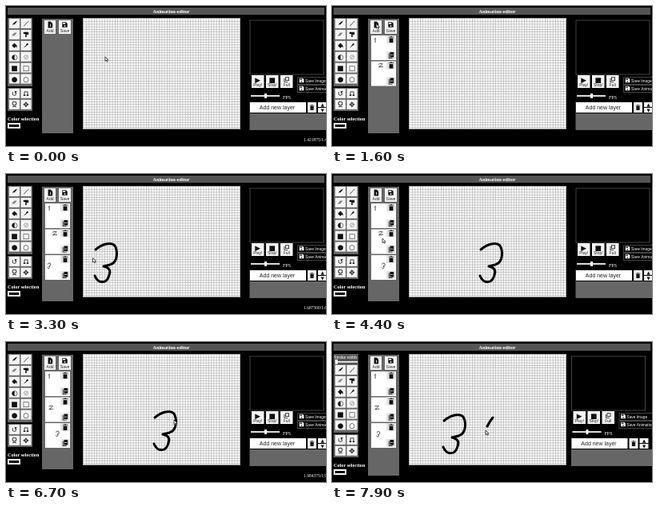
These frames come from a looping animation (400 by 176 pixels, 8 s). An HTML page with a canvas:

```html
<!DOCTYPE html>
<html lang="en">
<head>
<meta charset="utf-8">
<title>Animation-editor</title>
<style>
html, body { margin: 0; width: 100%; height: 100%; overflow: hidden; background: #000; }
canvas { display: block; }
</style>
</head>
<body>
<canvas id="stage" width="400" height="176"></canvas>
<script>
const ctx = document.getElementById('stage').getContext('2d');
const LOOP = 8000, PENCIL = 7450;
const SERIF = '"Liberation Serif", serif', SANS = '"Liberation Sans", sans-serif';
const GLYPHS = '"DejaVu Sans", sans-serif';

// Shapes in a 10 x 10 box; any other icon name is drawn as a glyph.
const shapes = {
  brush: 'M2 8L4 6L5 7L9 2L8 1L3 5Z',
  line: 'M1 9L9 1V2L2 9Z',
  eraser: 'M1 6L5 2H9L5 7H1Z',
  roller: 'M1 1H9V5H6V9H4V4H1Z',
  bucket: 'M1 5L5 1L9 5V8H8V6L5 9Z',
  picker: 'M1 9L5 4L7 1L9 3L6 5Z',
  nodes: 'M1 7H2V2H8V7H9V9H6V7H7V3H3V7H4V9H1Z',
  lasso: 'M5 0A3 3 0 1 0 5 7A3 3 0 1 0 5 0M5 1A2 2 0 1 1 5 6A2 2 0 1 1 5 1M2 8H8V9H2Z',
  add: 'M2 0H6L9 3V10H2ZM5 4V8H6V4Z',
  save: 'M1 1H7L9 3V9H1ZM2 2V4H6V2ZM4 6V8H6V6Z',
  trash: 'M2 3H8V10H2ZM1 1H4V0H6V1H9V2H1Z',
  copy: 'M1 2H2V9H7V10H1ZM3 0H9V8H3ZM4 4V5H8V4Z',
  full: 'M3 1H9V7H3ZM4 2V6H8V2ZM1 3H2V8H7V9H1Z'
};
const tools = ['brush', 'line', 'eraser', 'roller', 'bucket', 'picker', '◐', '⊘',
  '■', '□', '●', '○', '↺', 'nodes', 'lasso', '✥'];
const pale = ['eraser', '⊘'];

function inkPath(d) {
  const el = document.createElementNS('http://www.w3.org/2000/svg', 'path');
  el.setAttribute('d', d);
  return { el, path: new Path2D(d), length: el.getTotalLength() };
}
const digits = [
  'M119 48L127 40Q126 60 126 78',
  'M124 97C134 93 151 90 156 93C160 96 137 114 124 124Q142 122 160 121',
  'M186 95C194 88 205 85 210 90C214 97 213 108 208 112C204 115 199 115 196 116C204 118 205 122 203 127C200 139 189 138 185 128'
].map(inkPath);
const slash = inkPath('M201 95Q197 100 194 106');

const drawnAt = [[0, 0], [34, -56], [-74, 0]];
const drags = [
  { digit: 2, start: 3400, end: 3900, by: [74, 0] },
  { digit: 1, start: 4900, end: 5250, by: [-34, 56] },
  { digit: 2, start: 6750, end: 7200, by: [-46, 4] }
];
const strokes = [[100, 450], [1000, 1400], [1750, 2130]];
const added = [750, 1600, 2300];

const ramp = (t, a, b) => Math.min(1, Math.max(0, (t - a) / (b - a)));
const ease = p => p * p * (3 - 2 * p);

function offset(i, t, step = ease) {
  return drags.filter(d => d.digit === i).reduce(([x, y], d) => {
    const p = step(ramp(t, d.start, d.end));
    return [x + d.by[0] * p, y + d.by[1] * p];
  }, drawnAt[i]);
}

// Cursor stops: the hand follows each stroke and travels between the controls.
function follow(ink, [start, end], [dx, dy] = [0, 0]) {
  return Array.from({ length: 9 }, (_, i) => {
    const pt = ink.el.getPointAtLength(ink.length * i / 8);
    return [start + (end - start) * i / 8, pt.x + dx, pt.y + dy];
  });
}
const drag = ({ start, end, by: [dx, dy] }, x, y) => [[start, x, y], [end, x + dx, y + dy]];
const written = i => follow(digits[i], strokes[i], drawnAt[i]);
const stops = [
  [0, 124, 66], ...written(0), [750, 55, 24], [900, 73, 41],
  ...written(1), [1600, 55, 24],
  ...written(2), [2300, 59, 33], [2500, 61, 118], [2700, 61, 118],
  [3000, 25, 125], ...drag(drags[0], 136, 102), [4400, 63, 83], [4500, 63, 83],
  [4700, 25, 125], ...drag(drags[1], 175, 52), [5600, 60, 118], [5950, 60, 118],
  [6250, 25, 125], [6650, 210, 100], ...drag(drags[2], 210, 100),
  [PENCIL, 11, 23], ...follow(slash, [7780, 7880]), [7900, 192, 113], [LOOP, 192, 113]
];
function hand(t) {
  const i = stops.findIndex(s => s[0] > t);
  const [t0, x0, y0] = stops[i - 1], [t1, x1, y1] = stops[i];
  const p = ramp(t, t0, t1);
  return [x0 + (x1 - x0) * p, y0 + (y1 - y0) * p];
}

function box(x, y, w, h, color) {
  ctx.fillStyle = color;
  ctx.fillRect(x, y, w, h);
}

function text(str, x, y, font, color = '#fff', align = 'left') {
  ctx.font = font;
  ctx.fillStyle = color;
  ctx.textAlign = align;
  ctx.fillText(str, x, y);
}

function icon(name, x, y, size, color = '#111') {
  ctx.save();
  ctx.translate(x, y);
  ctx.scale(size / 10, size / 10);
  if (shapes[name]) {
    ctx.fillStyle = color;
    ctx.fill(new Path2D(shapes[name]), 'evenodd');
  } else {
    text(name, 5, 9, '11px ' + GLYPHS, color, 'center');
  }
  ctx.restore();
}

function button(x, y, w, h, name, size, label) {
  box(x, y, w, h, '#f4f4f4');
  icon(name, x + (w - size) / 2, y + (label ? 1.5 : (h - size) / 2), size, pale.includes(name) ? '#888' : '#111');
  if (label) text(label, x + w / 2, y + h - 2, '5px ' + SANS, '#222', 'center');
}

function slider(x, y, w, knob) {
  box(x, y, w, 2, '#ddd');
  box(x + knob, y - 2, 3, 6, '#fff');
}

function ink({ path, length }, [x, y] = [0, 0], progress = 1, width = 3) {
  if (!progress) return;
  ctx.save();
  ctx.translate(x, y);
  ctx.lineWidth = width;
  ctx.strokeStyle = '#000';
  ctx.lineCap = ctx.lineJoin = 'round';
  ctx.setLineDash(progress < 1 ? [progress * length, length * 2] : []);
  ctx.stroke(path);
  ctx.restore();
}

function toolbar(pencil) {
  ctx.save();
  if (pencil) {
    box(2, 15, 31, 14, '#555');
    text('Stroke width', 2.5, 20.5, 'bold 5.2px ' + SERIF, '#ddd');
    slider(4, 24, 28, 0);
    ctx.translate(0, 13);
  }
  box(2, 15, 31, 86, '#666');
  box(2, 103, 31, 29, '#666');
  tools.forEach((name, i) => {
    const row = i >> 1;
    button(4 + i % 2 * 14.5, 16 + row * 13.9 + (row > 5 ? 4.5 : 0), 13, 12, name, 8);
  });
  text('Color selection', 2, 144, 'bold 6.2px ' + SERIF);
  box(2, 147, 16, 7, '#fff');
  box(4, 149, 12, 3, '#000');
  ctx.restore();
}

function thumbnails(t, pencil) {
  box(45, 16, 39, pencil ? 152 : 144, '#666');
  button(48, 18, 14, 17, 'add', 8, 'Add');
  button(66, 18, 15, 17, 'save', 8, 'Save');
  added.forEach((at, i) => {
    if (t < at) return;
    const y = 37 + i * 32.5;
    box(49, y, 31, 31, '#fff');
    for (const [name, dy] of [['trash', 0], ['copy', 20]]) {
      box(68, y + dy, 11, 10, '#e4e4e4');
      icon(name, 70, y + dy + 1, 8);
    }
    ctx.save();
    ctx.translate(50, y);
    ctx.scale(.14, .14);
    ctx.translate(-97, -16);
    ink(digits[i], offset(i, t, Math.floor), 1, 5);
    ctx.restore();
  });
}

function drawingArea(t) {
  const pitch = 3.25;
  box(96, 15, 197, 140, '#aaa');
  box(97, 16, 195, 138, '#fff');
  ctx.fillStyle = '#bbb';
  for (let x = 97 + pitch; x < 292; x += pitch) ctx.fillRect(x, 16, .8, 138);
  for (let y = 16 + pitch; y < 154; y += pitch) ctx.fillRect(97, y, 195, .8);

  const writing = added.findIndex(at => t < at);
  if (writing >= 0) ink(digits[writing], drawnAt[writing], ramp(t, ...strokes[writing]));
  else if (t >= 2500) {
    const shown = t >= 4500 && t < 5700 ? 1 : 2;
    ink(digits[shown], offset(shown, t));
    ink(slash, [0, 0], ramp(t, 7780, 7880));
  }
}

function rightPanel(pencil) {
  ctx.save();
  if (pencil) ctx.translate(-5.5, 0);
  box(304.5, 17.5, 93, 69, '#444');
  box(305.5, 18.5, 91, 67, '#000');
  ['▶', '■', 'full'].forEach((name, i) =>
    button(307 + i * 18, 87, 15.5, 16, name, 8, ['Play!', 'Stop!', 'Full'][i]));
  ['Save Image', 'Save Animation'].forEach((label, i) => {
    const y = 90 + i * 10;
    box(364, y - 1, 44, 10, '#444');
    box(365, y, 42, 8, '#000');
    icon('save', 366, y, 7, '#fff');
    text(label, 374, y + 6, '4.8px ' + SANS);
  });
  slider(306, 112, 36, 17);
  text('FPS', 346, 116.5, '6px ' + SERIF);
  box(304.5, 120, 105, 36, '#666');
  box(305, 120, 102, 15, '#000');
  box(305, 121, 70, 13, '#fff');
  text('Add new layer', 339, 130, '7px ' + SANS, '#222', 'center');
  button(377, 121, 11, 13, 'trash', 7);
  button(390, 121, 11, 6, '▲', 5);
  button(390, 128, 11, 6, '▼', 5);
  ctx.restore();
}

function readout(t) {
  const value = (Math.floor(91 + t * 36 / 6700) / 64).toFixed(6);
  text(value + '/' + value, 372, 170, '5.5px ' + SERIF);
}

function cursor(x, y) {
  ctx.save();
  ctx.translate(x, y - 2);
  const arrow = new Path2D('M0 0V5.5L1.4 4.3L2.4 6.3L3.3 5.8L2.4 4H4Z');
  ctx.fillStyle = '#fff';
  ctx.strokeStyle = '#222';
  ctx.lineWidth = .8;
  ctx.fill(arrow);
  ctx.stroke(arrow);
  ctx.restore();
}

function draw(now) {
  const t = now % LOOP;
  const pencil = t >= PENCIL;
  const [x, y] = hand(t);
  box(0, 0, 400, 176, '#000');
  box(2, 2, 396, 9, '#555');
  text('Animation-editor', 206.5, 8.8, 'bold 6.2px ' + SERIF, '#fff', 'center');
  toolbar(pencil);
  thumbnails(t, pencil);
  drawingArea(t);
  rightPanel(pencil);
  if (x > 97 && !pencil) readout(t);
  cursor(x, y);
}

const start = performance.now();
(function tick() {
  draw(performance.now() - start);
  requestAnimationFrame(tick);
})();
</script>
</body>
</html>
```
